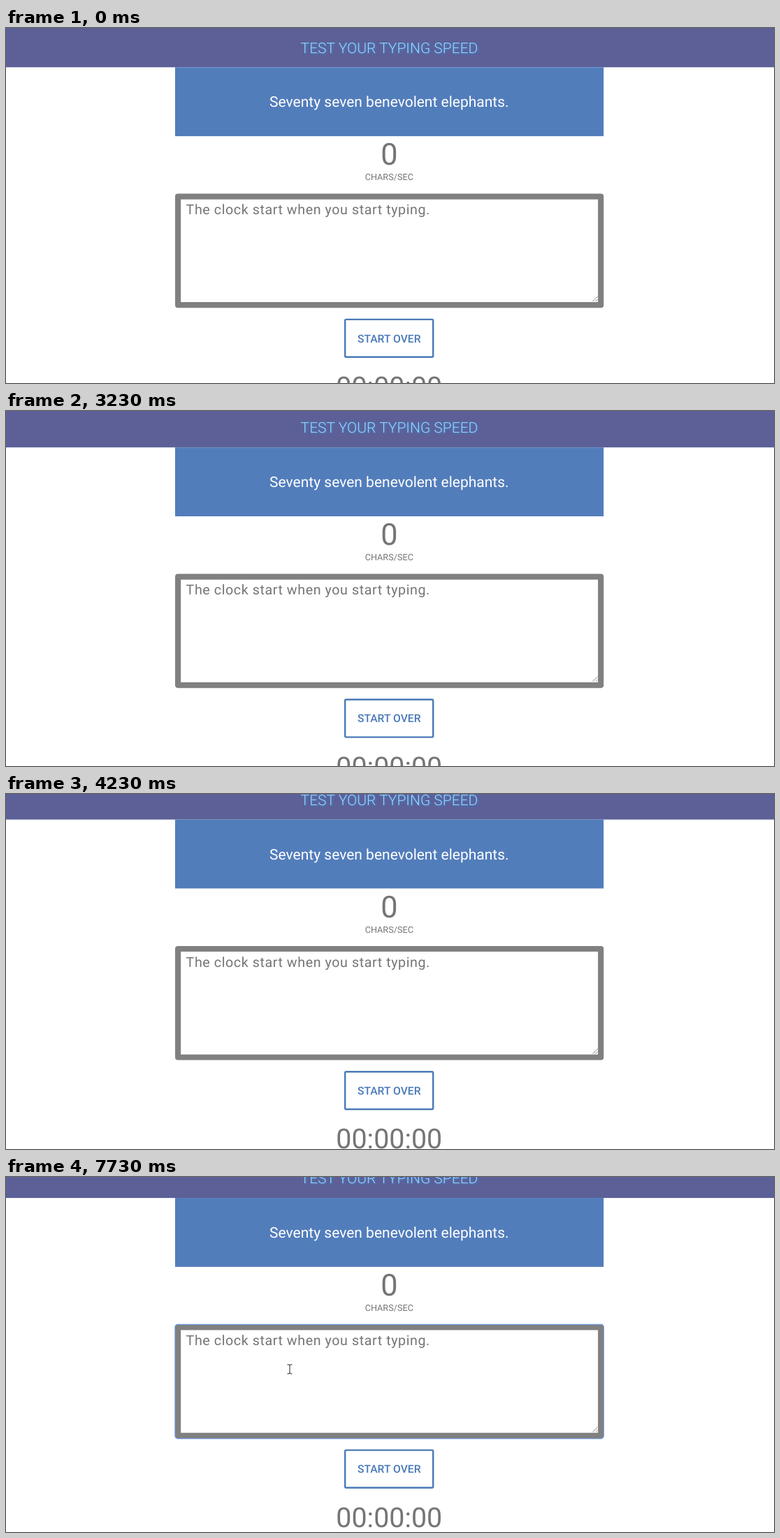
Write an HTML page that moves like this. It is 1099 by 509 pixels and loops after 8000 ms.

```html
<!DOCTYPE html>
<html lang="en">
<head>
<meta charset="utf-8">
<title>Typing speed test</title>
<style>
  html, body { margin: 0; width: 100%; height: 100%; overflow: hidden; background: #fff; }
  svg { display: block; width: 1099px; height: 509px; font-family: Roboto, sans-serif; text-rendering: geometricPrecision; }
  .mid { text-anchor: middle; }
  .grey { fill: #757575; }
  #title { font-size: 21px; font-weight: 300; fill: #94d6fa; filter: drop-shadow(1px 1px 1.5px #3f86d8); }
  #sentence { font-size: 21px; fill: #fff; }
  #rate { font-size: 43.3px; }
  #unit { font-size: 12.7px; }
  #hint { font-size: 19.68px; letter-spacing: .575px; }
  #button { font-size: 15.7px; font-weight: 500; fill: #4a7ab8; }
  #timer { font-size: 39.4px; }
</style>
</head>
<body>
<svg viewBox="0 0 1099 509">
  <g id="page">
    <rect width="1099" height="56.3" fill="#5c6097"/>
    <rect x="242" y="56.3" width="613.2" height="98.8" fill="#527dbb"/>
    <text id="title" class="mid" x="548.5" y="35.6">TEST YOUR TYPING SPEED</text>
    <text id="sentence" class="mid" x="548.3" y="113.4">Seventy seven benevolent elephants.</text>
    <text id="rate" class="mid grey" x="548.5" y="196.2">0</text>
    <text id="unit" class="mid grey" x="548.3" y="218.3">CHARS/SEC</text>

    <rect x="246.1" y="241.7" width="605.1" height="155.5" fill="#fff" stroke="#808080" stroke-width="8.2" stroke-linejoin="round"/>
    <rect id="focus" x="241.9" y="237.6" width="613.5" height="163.7" rx="4" fill="none" stroke="#6f9be0" stroke-width="1.2"/>
    <path d="M839.5 392l7-7m-2.8 7l2.8-2.8" stroke="#777" stroke-width=".9" fill="none"/>
    <text id="hint" class="grey" x="257.6" y="267.3">The clock start when you start typing.</text>
    <rect id="caret" x="258" y="249.3" width="1" height="24" fill="#222"/>

    <rect x="485.2" y="417.9" width="126" height="53.8" rx="1.5" fill="#fff" stroke="#4a7ab8" stroke-width="2.4"/>
    <text id="button" class="mid" x="548.3" y="450.6">START OVER</text>
    <text id="timer" class="mid grey" x="548.3" y="528">00:00:00</text>
  </g>
  <g id="pointer">
    <circle id="press" cx="-2" cy="-1" r="9.5" fill="#ffff6e"/>
    <path id="beam" d="M-3.5-6.5h2.5l1 1 1-1h2.5M0-5.5v11M-3.5 6.5h2.5l1-1 1 1h2.5" fill="none" stroke="#222"/>
    <path id="arrow" d="M.5.8v12.7l3-2.8 1.9 4.6 1.9-.8-1.9-4.4h4z" fill="#fff" stroke="#000" stroke-width=".8"/>
  </g>
</svg>
<script>
const LOOP = 8000, STEP = 74, PIXEL = 0.82;
const PRESS = 6080, FOCUS = 6160, BLINK = 550;

const legs = [
  { start: 510, steps: 3, from: [990, 498], to: [890, 320] },
  { start: 890, steps: 3, from: [890, 320], to: [1081, 149] },
  { start: 1290, steps: 3, from: [1081, 149], to: [1100, 125] },
  { start: 5240, steps: 3, from: [937, 185], to: [526, 116] },
  { start: 5700, steps: 5, from: [526, 116], to: [406, 275.5] },
];

const el = id => document.getElementById(id);
const show = (id, on) => el(id).setAttribute("visibility", on ? "visible" : "hidden");
const move = (id, x, y) => el(id).setAttribute("transform", `translate(${x} ${y})`);

// Share of a stepped move that is done; the first step comes at once.
function progress(t, start, steps) {
  const done = Math.floor((t - start) / STEP) + 1;
  return Math.min(Math.max(done, 0), steps) / steps;
}

// Slow drag, two single nudges, then a quicker drag, in whole page pixels.
function scrolled(t) {
  return Math.ceil(10 * progress(t, 3080, 7) + progress(t, 3760, 1) + progress(t, 3990, 1)
    + 20 * progress(t, 4140, 3) ** 1.3);
}

function pointerAt(t) {
  const leg = legs.filter(l => l.start <= t).pop();
  if (!leg) return [-100, -100];
  const p = progress(t, leg.start, leg.steps);
  return leg.from.map((a, i) => a + (leg.to[i] - a) * p);
}

function draw(t) {
  move("page", 0, -scrolled(t) * PIXEL);

  const [x, y] = pointerAt(t);
  const inField = x > 242 && x < 855 && y > 212;
  move("pointer", x, y);
  show("arrow", !inField);
  show("beam", inField);
  show("press", t >= PRESS && t < FOCUS);

  show("focus", t >= FOCUS);
  show("caret", t >= FOCUS && Math.floor((t - PRESS) / BLINK) % 2 === 0);
}

function tick() {
  draw(performance.now() % LOOP);
  requestAnimationFrame(tick);
}
tick();
</script>
</body>
</html>
```
